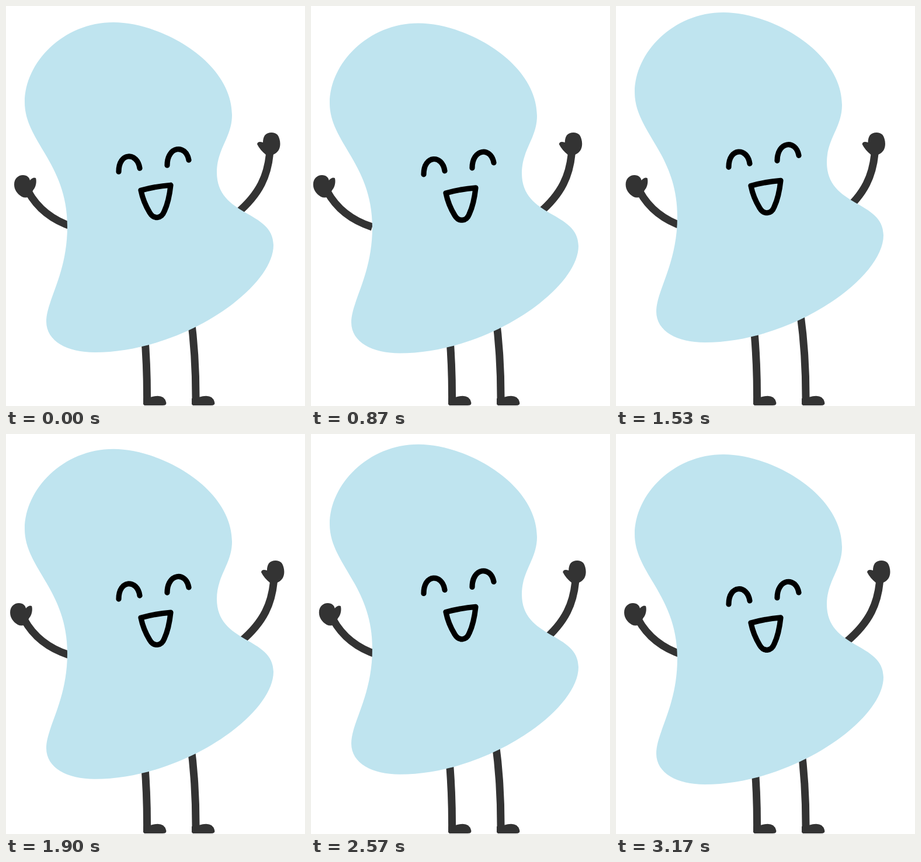
Write an HTML page that moves like this. It is 512x686 px and loops after 5.01 s.

```html
<!DOCTYPE html>
<html lang="en">
<head>
<meta charset="utf-8">
<title>Happy blob</title>
<style>
html, body { margin: 0; width: 100%; height: 100%; overflow: hidden; background: #fff; }
svg { display: block; width: 100%; height: 100%; }
.limb { fill: none; stroke: #333; stroke-width: 13; }
.solid { fill: #333; }
#body { fill: #bfe4ef; }
#face { fill: none; stroke: #000; stroke-width: 9.2; stroke-linecap: round; stroke-linejoin: round; }
</style>
</head>
<body>
<svg viewBox="0 0 512 686">
  <defs>
    <path id="foot" class="solid" d="M235 683V673L247 671Q270 664 274 679Q276 685 268 685H237Z"/>
  </defs>
  <path class="limb" d="M237 560Q242 620 241.500 680M316 530Q325.500 600 325 680"/>
  <use href="#foot"/>
  <use href="#foot" x="83"/>
  <g id="leftArm">
    <path class="limb" d="M38 318Q62 362 115 379"/>
    <path class="solid" d="M14 306C14 296 21 290 29 290C36 290 40 294 41 299Q46 293 51 295C53 301 51 311 47 315L40 327Q33 330 27 327C19 322 14 315 14 306Z"/>
  </g>
  <g id="rightArm">
    <path class="limb" d="M452 248C449 290 435 322 395 356"/>
    <path class="solid" d="M443 222C448 216 459 215 465 221C470 228 471 240 467 247C462 255 452 258 445 255Q435 247 430 237Q431 231 440 234Q440 227 443 222Z"/>
  </g>
  <path id="body" d="M184 28C265 28 387 95 387 187C387 225 361 245 361 285C361 362 458 350 458 410C458 485 300 594 152 594C105 594 69 575 69 541C69 505 105 460 105 378C105 270 32 232 32 165C32 97 98 28 184 28Z"/>
  <g id="face">
    <path d="M193 281C193 247 225 247 229 275M276 270C276 237 308 233 313 261"/>
    <path d="M231 313Q256 306 282 304Q279 332 271 349C266 362 253 363 246 351Q235 333 231 313Z"/>
  </g>
</svg>
<script>
const LOOP = 5010, STEP = 100 / 3, REST = 3170;
const { PI, sin, cos, min, max, floor } = Math;

// Cosine wave that is zero at the moment of rest.
function wave(time, amplitude, period, lead = 0) {
  const angle = ms => 2 * PI * ms / period;
  return amplitude * (cos(angle(REST - time + lead)) - cos(angle(lead)));
}

const progress = (time, from, to) => max(0, min(1, (time - from) / (to - from)));

function move(id, x, y) {
  document.getElementById(id).setAttribute("transform", `translate(${x} ${y})`);
}

function draw(elapsed) {
  const time = min(REST, floor((elapsed % LOOP + 3.4) / STEP) * STEP);
  const left = progress(time, 600, 3050);
  const right = progress(time, 375, 2685);
  move("body", 0, 7 + wave(time, 9, 1170, 90) + wave(time, 3.7, 3600));
  move("face", 0, 11 + wave(time, 8, 1150, 50) + wave(time, 3, 840));
  move("leftArm", (6 * left - 11) * sin(5 * PI * left), 0);
  move("rightArm", 8.5 * sin(PI * right) * sin(7 * PI * right), 0);
}

const start = performance.now();
function tick() {
  draw(performance.now() - start);
  requestAnimationFrame(tick);
}
tick();
</script>
</body>
</html>
```
